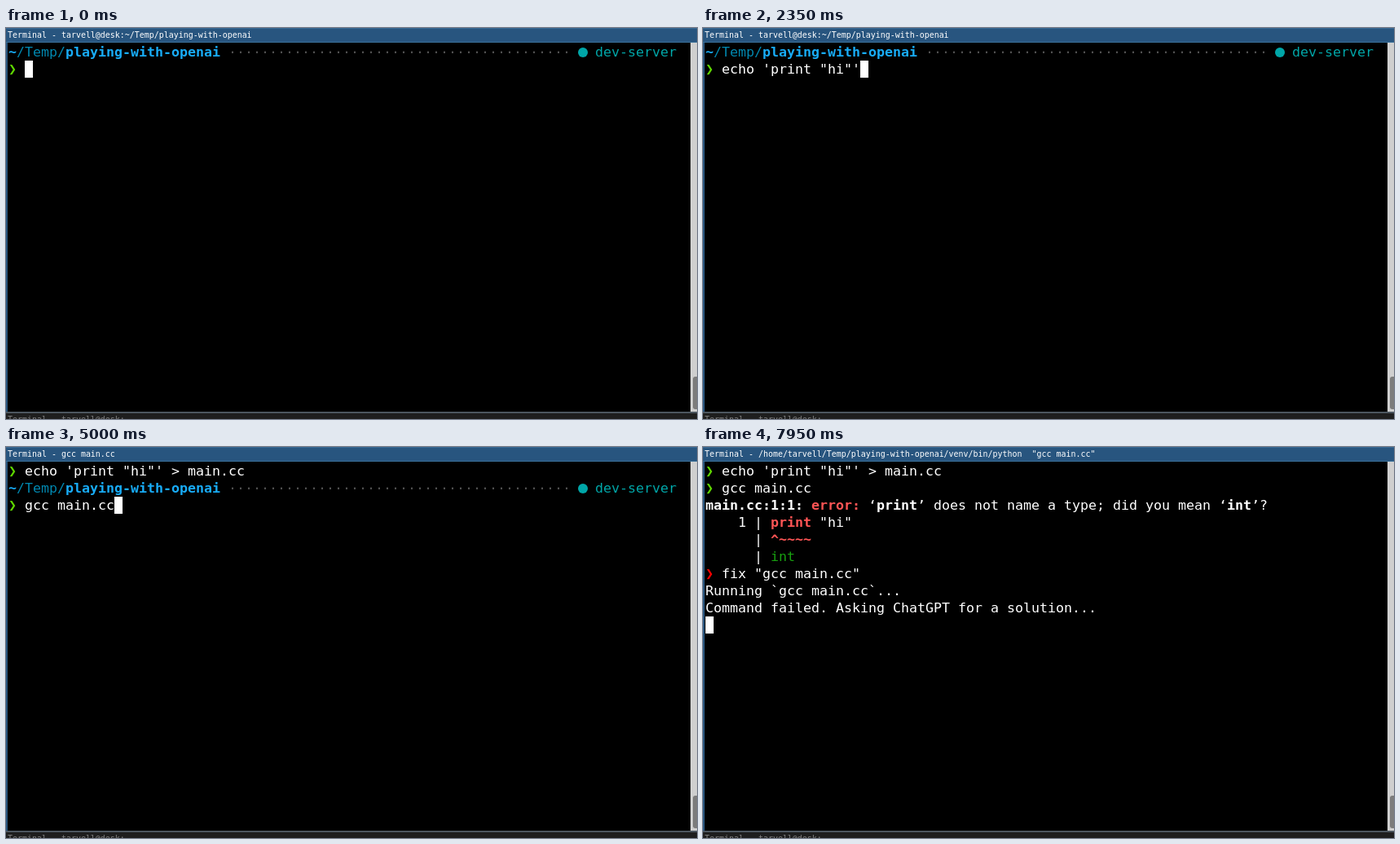
Write an HTML page that moves like this. It is 848x480 px and loops after 8 s.

```html
<!DOCTYPE html>
<html lang="en">
<head>
<meta charset="utf-8">
<title>Terminal</title>
<style>
html, body { margin: 0; width: 100%; height: 100%; overflow: hidden; background: #000; }
#stage { position: relative; width: 848px; height: 480px; overflow: hidden; background: #000;
  font-family: "DejaVu Sans Mono", monospace; font-variant-ligatures: none; }
#stage div { position: absolute; white-space: pre; box-sizing: border-box; }
.bar { left: 0; width: 848px; padding-left: 2px; font-size: 9.966px; line-height: 16px; }
#title { top: 0; height: 18px; background: #28557f; color: #fff;
  border-top: 1px solid #396a94; border-bottom: 1px solid #3a7099; }
#edge { left: 0; top: 18px; width: 2px; height: 454px; background: #28557f; }
#track { left: 840px; top: 18px; width: 8px; height: 453px; background: #cfcfcf; }
#thumb { left: 843px; top: 428px; width: 5px; height: 40px; background: #7c7c7c; border-radius: 3px 0 0 3px; }
#foot { left: 0; top: 471px; width: 848px; height: 2px; background: #4c565f; }
#next { top: 473px; height: 7px; overflow: hidden; background: #1e1e1e; color: #808080; }
#next span { position: relative; top: -.5px; }
#screen { left: 3px; top: 19px; width: 837px; height: 452px; overflow: hidden;
  font-size: 16.61px; line-height: 21px; color: #fff; }
#screen div { left: 0; height: 21px; }
#cursor { width: 10px; height: 21px; background: #fff; color: #000;
  font-size: 16.61px; line-height: 21px; }
#screen span { display: inline-block; height: 21px; vertical-align: top; }
.ok { color: #5fd700; width: 10px; }
.bad { color: #f00; width: 10px; }
.dir { color: #0087af; }
.here { color: #18acf8; font-weight: bold; }
.dots { color: #505050; }
.env { color: #00a6a8; }
.err { color: #ff5555; font-weight: bold; }
.hint { color: #18a010; }
.icon { width: 12px; margin: 0 -1px; }
.icon::before { content: ""; position: absolute; left: 699px; top: 5px; width: 12px; height: 12px;
  border-radius: 50%; background: #00a6a8; }
</style>
</head>
<body>
<div id="stage">
  <div id="title" class="bar"></div>
  <div id="screen"></div>
  <div id="cursor"></div>
  <div id="edge"></div>
  <div id="track"></div>
  <div id="thumb"></div>
  <div id="foot"></div>
  <div id="next" class="bar"><span>Terminal - tarvell@desk:</span></div>
</div>
<script>
const LOOP = 8000;
const $ = id => document.getElementById(id);
const span = (cls, text) => `<span class="${cls}">${text}</span>`;

const ECHO = `echo 'print "hi"' > main.cc`;
const GCC = 'gcc main.cc';
const FIX = `fix "${GCC}"`;
const IDLE = 'tarvell@desk:~/Temp/playing-with-openai';
const PYTHON = `/home/tarvell/Temp/playing-with-openai/venv/bin/python  "${GCC}"`;

const ok = text => span('ok', '❯') + ' ' + text;
const bad = text => span('bad', '❯') + ' ' + text;
const path = span('here', '~') + span('dir', '/Temp/') + span('here', 'playing-with-openai') + ' ' +
  span('dots', '·'.repeat(42)) + ' ' + span('icon', '') + ' ' + span('env', 'dev-server');
const errors = [
  `<b>main.cc:1:1:</b> ${span('err', 'error:')} ‘<b>print</b>’ does not name a type; did you mean ‘<b>int</b>’?`,
  `    1 | ${span('err', 'print')} "hi"`,
  `      | ${span('err', '^~~~~')}`,
  `      | ${span('hint', 'int')}`
];

// Key press times for each typed command
const echoKeys = [700, 800, 900, 950, 1050, 1150, 1300, 1400, 1450, 1600, 1700, 1800, 1950, 2100,
  2150, 2250, 2350, 2500, 2600, 2700, 2800, 2850, 2900, 2950, 3050, 3100, 3200];
const gccKeys = [3500, 3600, 3700, 3800, 3900, 3950, 4000, 4050, 4150, 4200, 4300];
const fixKeys = [6600, 6700, 6750, 6850, 7000];
const pressed = (keys, t) => keys.filter(k => k <= t).length;

// Recalled command: history, closing quote, jump to start, then the prefix
function editFix(t) {
  if (t < 5650) return ['', 0];
  if (t < 6000) return [GCC, 11];
  const n = pressed(fixKeys, t);
  return [FIX.slice(0, n) + GCC + '"', t < 6350 ? 12 : n];
}

function view(t) {
  if (t < 3300) {
    const n = pressed(echoKeys, t), text = ECHO.slice(0, n);
    return { title: t < 3250 ? IDLE : ECHO, rows: [path, ok(text)], col: n + 2 };
  }
  if (t < 5050) {
    const n = pressed(gccKeys, t);
    return { title: t < 5000 ? IDLE : GCC, rows: [ok(ECHO), path, ok(GCC.slice(0, n))], col: n + 2 };
  }
  const rows = [ok(ECHO), ok(GCC), ...errors];
  if (t < 5100) return { title: GCC, rows: [...rows, ''], col: 0 };
  if (t < 7450) {
    const [text, at] = editFix(t);
    return { title: t < 7400 ? IDLE : FIX, rows: [...rows, path, bad(text)],
      col: at + 2, under: text[at] };
  }
  rows.push(bad(FIX), `Running \`${GCC}\`...`);
  if (t >= 7500) rows.push('Command failed. Asking ChatGPT for a solution...');
  return { title: PYTHON, rows: [...rows, ''], col: 0 };
}

const start = performance.now();
let shown = '';

function draw() {
  const v = view((performance.now() - start) % LOOP);
  const key = JSON.stringify(v);
  if (key !== shown) {
    shown = key;
    $('title').textContent = 'Terminal - ' + v.title;
    $('screen').innerHTML = v.rows.map((r, i) => `<div style="top:${i * 21}px">${r}</div>`).join('');
    const c = $('cursor');
    c.style.left = 3 + v.col * 10 + 'px';
    c.style.top = 19 + (v.rows.length - 1) * 21 + 'px';
    c.textContent = v.under || '';
  }
  requestAnimationFrame(draw);
}
draw();
</script>
</body>
</html>
```
